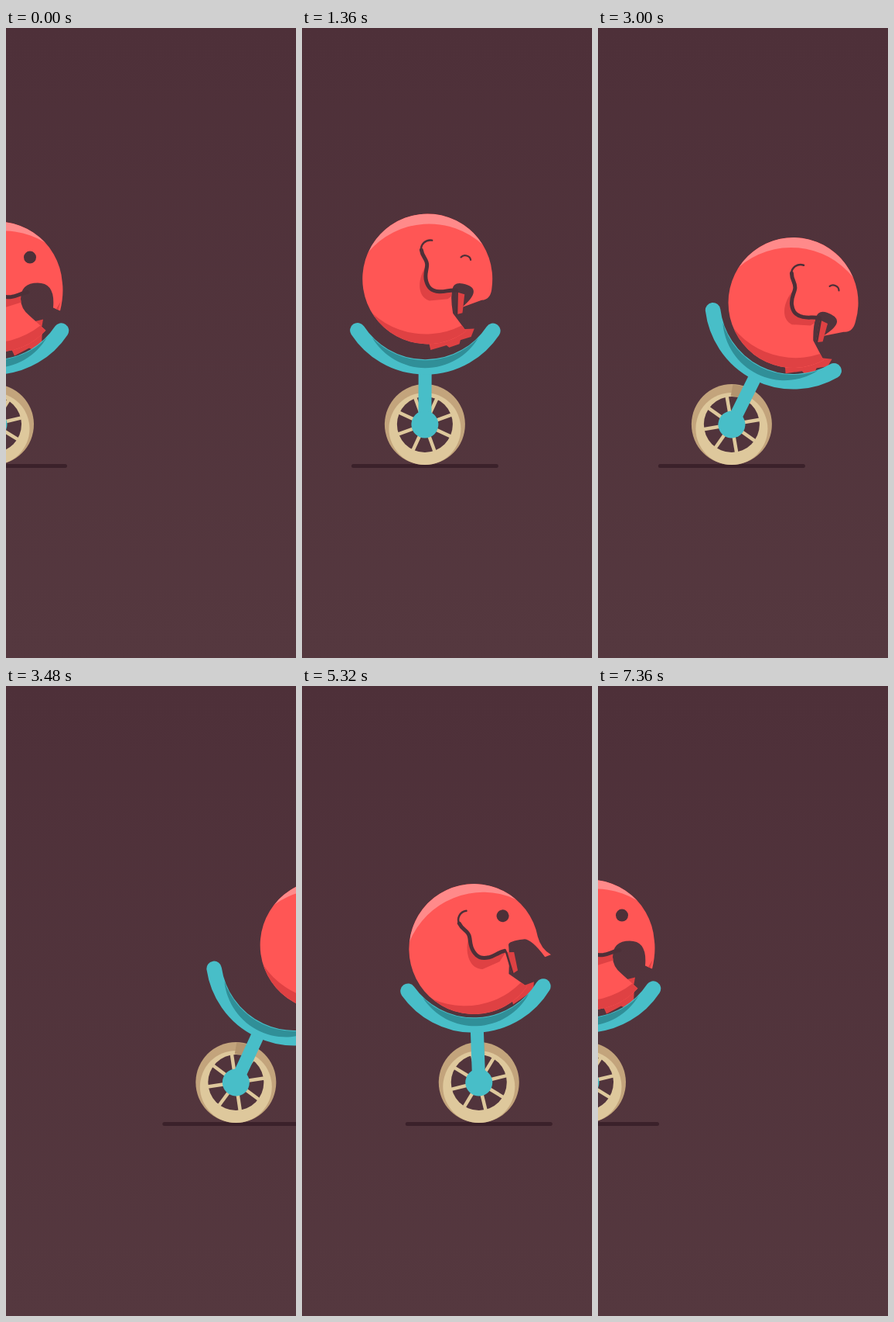
Animation of 375 by 812 pixels, one loop 7.4 s. Source, as an HTML page:

```html
<!DOCTYPE html>
<html lang="en">
<head>
<meta charset="utf-8">
<title>Elephant on a unicycle</title>
<style>
  html, body { margin: 0; width: 100%; height: 100%; overflow: hidden; background: #51343c; }
  svg { display: block; width: 375px; height: 812px; background: linear-gradient(#4e3039, #55383f); }
  .red { fill: #ff5655; }
  .deep { fill: #df4143; }
  .ink { fill: none; stroke: #4d3038; stroke-linecap: round; stroke-linejoin: round; }
  .teal { stroke: #48bec8; fill: none; stroke-linecap: round; }
</style>
</head>
<body>
<svg viewBox="0 0 375 812">
  <defs><clipPath id="skin"><path id="skinPath"/></clipPath></defs>

  <line id="ground" x1="-92.5" x2="92.5" y1="564.5" y2="564.5" stroke="#3b212a" stroke-width="5" stroke-linecap="round"/>

  <g id="ball">
    <path id="rearFoot" class="deep" d="M16 76 L22 89 L41 79 L45 81 L57 74 L58 56 Z"/>
    <path id="frontFoot" class="deep" d="M52 56 L72 51 L70 62 L42 77 L38 60 Z"/>
    <path id="body" class="red"/>
    <g clip-path="url(#skin)">
      <path id="shine" fill="#ff8a8a"/>
      <path id="shade" class="deep"/>
      <path class="deep" d="M-4 -18 C-13 0 -10 25 8 27 L31 20 L42 7 C30 10 20 14 12 13 C3 12 0 4 -4 -18 Z"/>
    </g>
    <path class="ink" stroke-width="2.5" d="M-4 -50 C-12 -50 -18 -42 -15 -34"/>
    <path class="ink" stroke-width="5" d="M-15 -35 C-12 -26 -5 -25 -4 -17 C-3 -10 -5 -5 -1 3 C3 11 8 14 18 13 C26 12 30 8 39 7"/>
    <g id="leg">
      <path class="deep" d="M40 9 L51 10 L53 34 L45 38 Z"/>
      <path class="ink" stroke-width="2.5" d="M41 9 L46 37"/>
    </g>
    <circle id="eyeOpen" cx="42" cy="-38" r="8" fill="#4d3038"/>
    <path id="eyeShut" class="ink" stroke-width="2.2" d="M37 -36 A7 6 0 0 1 50 -35"/>
  </g>

  <g id="wheel">
    <circle r="52" fill="#c3a47c"/>
    <circle r="46.500" cy="5.500" fill="#dec89c"/>
    <line id="postShade" y1="-36" y2="-51" stroke="#b3946e" stroke-width="16"/>
    <circle r="36" fill="#51343c"/>
    <g id="spokes" stroke="#dec89c" stroke-width="4.5"></g>
  </g>

  <g id="frame">
    <path class="teal" stroke-width="17" d="M0 0 V-70"/>
    <path class="teal" stroke-width="19.500" d="M-87.500 -121 A105 105 0 0 0 87.500 -121"/>
    <path id="bowlShade" fill="#308f98" transform="translate(0 -178.4)"/>
    <circle r="17.500" fill="#48bec8"/>
  </g>
</svg>

<script>
const LOOP = 7400, START_X = -16, HUB_Y = 511;
const BALL_R = 84, BOWL_R = 95.6, BOWL_RISE = 178.4;

const el = id => document.getElementById(id);
const rad = deg => deg * Math.PI / 180;
const polar = (r, deg) => [r * Math.cos(rad(deg)), r * Math.sin(rad(deg))];
const fmt = p => p.map(v => v.toFixed(2)).join(' ');

// Cubic ease in and out, from 0 to 1 between times a and b
function ramp(t, a, b) {
  const p = Math.min(1, Math.max(0, (t - a) / (b - a)));
  return p < 0.5 ? 4 * p ** 3 : 1 - 4 * (1 - p) ** 3;
}

// Sum of smooth swells, each [centre time, half width, height]
const swell = (t, ...parts) => parts.reduce((sum, [mid, half, height]) => {
  const d = Math.abs(t - mid) / half;
  return d < 1 ? sum + height * Math.cos(d * Math.PI / 2) ** 2 : sum;
}, 0);

const hubX = t => START_X + 176 * ramp(t, 0, 1540) - 9 * ramp(t, 1600, 2200)
  + 239 * ramp(t, 2470, 4340) - 406 * ramp(t, 4300, 6505);
const lean = t => swell(t, [720, 720, 7.2], [2160, 600, -14.7], [3200, 1300, 28.1], [4900, 700, -6], [6160, 500, 5.6]);
const roll = t => swell(t, [850, 850, 33], [2160, 700, -23], [3300, 800, 29], [5000, 700, -12]);
const stand = t => 1 - ramp(t, 0, 350) + ramp(t, 6100, 6880);

// Shift of the ball from its seat in the bowl: two hops, then a settling step
const hopX = t => swell(t, [850, 600, 50], [4000, 1000, 85], [6160, 500, -7]) + 5 * stand(t);
const hopY = t => swell(t, [1000, 800, -36], [4100, 1600, -40]) - 10.6 * stand(t);

const tucked = t => ramp(t, 300, 650) - ramp(t, 1350, 1700) + ramp(t, 2450, 2800) - ramp(t, 4000, 4500);
const reaching = t => ramp(t, 4000, 4500) - ramp(t, 6250, 6750);

// Trunk points: outer tip, inner tip, top of the mouth, back of the mouth
const poses = {
  curl: [81, 31, 72, 27, 52, -5, 30, 16],
  tuck: [74, 13, 51, 27, 46, -3, 34, 7],
  reach: [98, 19, 90, 21, 65, -5, 45, 0]
};

function outline(tuck, reach) {
  const [ax, ay, bx, by, cx, cy, dx, dy] = poses.curl.map((v, i) =>
    v + tuck * (poses.tuck[i] - v) + reach * (poses.reach[i] - v));
  return `M${fmt(polar(BALL_R, 42))} A${BALL_R} ${BALL_R} 0 1 1 ${fmt(polar(BALL_R, -4))}
    Q86 10 ${fmt([ax, ay])} L${fmt([bx, by])}
    Q${fmt([75, cy])} ${fmt([cx, cy])} Q${fmt([dx, cy])} ${fmt([dx, dy])}
    Q${fmt([dx, dy + 12])} 41 37 Z`;
}

function crescent(r, mid, half, back) {
  const a = fmt(polar(r, mid - half)), b = fmt(polar(r, mid + half));
  return `M${a} A${r} ${r} 0 0 1 ${b} A${back} ${back} 0 0 0 ${a} Z`;
}

el('shine').setAttribute('d', crescent(BALL_R, -105, 62, 103));
el('shade').setAttribute('d', crescent(BALL_R, 75, 62, 103));
el('bowlShade').setAttribute('d', crescent(BOWL_R, 90, 46, 80));
el('spokes').innerHTML = Array.from({ length: 8 }, (_, i) =>
  `<line x2="37" transform="rotate(${i * 45})"/>`).join('');

const place = (id, value) => el(id).setAttribute('transform', value);
const show = (id, on) => el(id).setAttribute('opacity', on ? 1 : 0);
const foot = (id, out) => place(id, `scale(${0.82 + 0.18 * out})`);

function draw(now) {
  const t = now % LOOP, hub = hubX(t), tilt = lean(t), up = stand(t), tuck = tucked(t);
  const x = hub + BOWL_RISE * Math.sin(rad(tilt)) + hopX(t);
  const y = HUB_Y - BOWL_RISE * Math.cos(rad(tilt)) + BOWL_R - BALL_R + hopY(t);

  place('ground', `translate(${hub} 0)`);
  place('wheel', `translate(${hub} ${HUB_Y})`);
  place('spokes', `rotate(${31.5 + 0.734 * (hub - START_X)})`);
  place('postShade', `rotate(${tilt * 0.4})`);
  place('frame', `translate(${hub} ${HUB_Y}) rotate(${tilt})`);
  place('ball', `translate(${x} ${y}) rotate(${roll(t)})`);
  foot('frontFoot', 1 - up);
  foot('rearFoot', Math.max(up, tuck));

  const d = outline(tuck, reaching(t));
  el('body').setAttribute('d', d);
  el('skinPath').setAttribute('d', d);

  const shut = t > 480 && t < 4400;
  show('eyeShut', shut);
  show('eyeOpen', !shut);
  show('leg', t > 480 && t < 6500);
}

function tick(now) {
  draw(now);
  requestAnimationFrame(tick);
}
draw(0);
requestAnimationFrame(tick);
</script>
</body>
</html>
```
